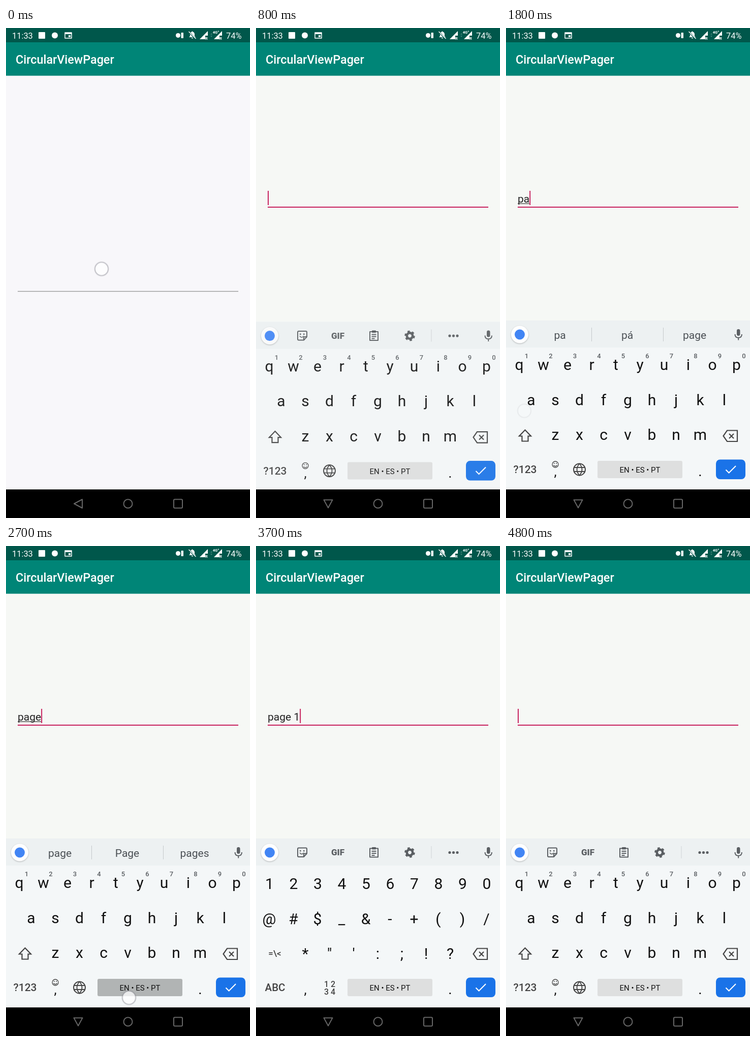
An HTML page with a canvas for the animation above (5100 ms loop, 480 by 960 pixels).

```html
<!DOCTYPE html>
<html lang="en">
<head>
<meta charset="utf-8">
<title>CircularViewPager</title>
<style>
html, body { margin: 0; height: 100%; overflow: hidden; background: #f6f8f5; }
canvas { display: block; }
</style>
</head>
<body>
<canvas id="stage" width="480" height="960"></canvas>
<script>
const ctx = document.getElementById('stage').getContext('2d');
const LOOP = 5100, STEP = 100;
const PINK = '#c8235f', ICON = '#5a5e62', INK = '#111';

// All schedules are [start ms, value], in order of time.
const TYPED = [[0, ''], [1300, 'p'], [1700, 'pa'], [2300, 'pag'], [2500, 'page'], [2800, 'page '], [3600, 'page 1']];
const WORDS = [[0, null], [1400, ['p', 'P', 'para']], [1800, ['pa', 'pá', 'page']], [2400, ['pag', 'page', 'pages']],
  [2600, ['page', 'Page', 'pages']], [2900, ['of', 'is', 'for']], [3700, null]];
const LAYOUT = [[0, 'letters'], [3200, 'symbols'], [4200, 'plain'], [4800, 'letters']];
// Touches: start, full until, faded until, x, y
const TOUCHES = [[0, 100, 200, 188, 472], [1100, 1300, 1400, 448, 665], [1500, 1700, 1800, 36, 750],
  [2200, 2300, 2400, 240, 730], [2400, 2500, 2600, 121, 662], [2700, 2800, 2900, 242, 885],
  [3000, 3200, 3300, 19, 891], [3500, 3600, 3700, 30, 655], [3900, 4000, 4100, 442, 865], [4500, 4600, 4700, 188, 315]];

const at = (schedule, t) => schedule.filter(([start]) => start <= t).pop()[1];
const quint = u => 1 - (1 - Math.min(1, Math.max(0, u))) ** 5;

function rect(x, y, w, h, color, r = 0) {
  ctx.fillStyle = color;
  ctx.beginPath();
  ctx.roundRect(x, y, w, h, r);
  ctx.fill();
}
// Filled unless a line width is given
function path(d, color, width) {
  const p = new Path2D(d);
  if (width) {
    ctx.strokeStyle = color;
    ctx.lineWidth = width;
    ctx.stroke(p);
  } else {
    ctx.fillStyle = color;
    ctx.fill(p);
  }
}
function circle(x, y, r, color, width) {
  path(`M${x - r} ${y}a${r} ${r} 0 1 1 ${2 * r} 0a${r} ${r} 0 1 1 ${-2 * r} 0z`, color, width);
}
function text(s, x, y, size, color = INK, weight = 400, align = 'center') {
  ctx.font = `${weight} ${size}px Roboto, sans-serif`;
  ctx.textAlign = align;
  ctx.fillStyle = color;
  ctx.fillText(s, x, y);
}
function row(keys, x, y, size = 30, color, weight) {
  [...keys].forEach((key, i) => text(key, x + i * 47.5, y, size, color, weight));
}

function drawHeader() {
  rect(0, 0, 480, 28, '#00574b');
  rect(0, 28, 480, 65.5, '#008577');
  text('CircularViewPager', 19, 70, 23.35, '#fff', 500, 'left');
  text('11:33', 12, 20.5, 16.4, '#fff', 400, 'left');
  text('74%', 433, 20.5, 16.4, '#fff', 400, 'left');
  rect(64, 8, 13, 13, '#fff', 1);
  circle(96, 14.5, 6, '#fff');
  path('M116 9h13v11h-13z', '#fff', 1.5);
  rect(116, 9, 13, 3, '#fff');
  rect(123, 14, 4, 4, '#fff');
  circle(338.5, 14.5, 4.5, '#fff');
  rect(344.5, 9, 4.5, 11, '#fff', 1);
  path('M360 18h13l-2-2v-4q-.5-4-3.5-4.5q-1-2.500-2 0q-3 .5-3.500 4.500v4zM364.500 19h4q-2 3.500-4 0z', '#fff');
  path('M359 6.500l14 15', '#00574b', 3);
  path('M359.500 7l14 14', '#fff', 1.4);
  for (const x of [381, 409]) {
    path(`M${x + 16} 6v9h-5v7h-${11}z`, '#fff');
    text('R', x + 13.5, 22.5, 7.5, '#fff', 700);
  }
  rect(407, 4, 12, 8, '#00574b');
  text('4G⁺', 413, 11, 7.5, '#fff', 700);
  path('M402 13l2-3l2 3zM402 15l2 3l2-3z', '#3f8177');
}

function drawNav(open) {
  rect(0, 904, 480, 56, '#000');
  ctx.lineJoin = 'round';
  path(open ? 'M133.500 924.500h17l-8.500 15.500z' : 'M150 923.500v17l-16-8.500z', '#666', 2);
  circle(240, 932, 8.5, '#666', 2);
  path('M332 923.500h13q2 0 2 2v13q0 2-2 2h-13q-2 0-2-2v-13q0-2 2-2z', '#666', 2);
}

function drawField(x, y, focused, value, composing) {
  rect(x + 23, y - (focused ? 1 : .5), 434, focused ? 2 : 1, focused ? PINK : '#777');
  text(value, x + 23, y - 9, 21, '#222', 400, 'left');
  const width = ctx.measureText(value).width;
  if (composing) rect(x + 23, y - 7.5, width, 1.2, '#333');
  if (focused) rect(x + 23 + width, y - 32, 2, 28, PINK);
}

function drawToolbar() {
  path('M84 591.500h14q2 0 2 2v9l-6 6.500h-10q-2 0-2-2v-13.500q0-2 2-2zM100 602.500h-4q-2 0-2 2v4', ICON, 2);
  path('M86 601q4 5 8 0', ICON, 1.6);
  rect(86, 596, 2.5, 2.5, ICON);
  rect(93, 596, 2.5, 2.5, ICON);
  text('GIF', 161, 606, 17, ICON, 900);
  path('M224 592.500h16v17h-16zM227.500 598h9m-9 4h9m-9 4h6', ICON, 2);
  rect(228, 590, 8, 4.5, ICON, 1);
  circle(302.5, 600.5, 5.7, ICON, 4.6);
  const tooth = 8.5 * Math.PI / 6;
  ctx.setLineDash([tooth, tooth]);
  circle(302.5, 600.5, 8.5, ICON, 3.6);
  ctx.setLineDash([]);
  rect(344.5, 588, 1, 24, '#cfd3d5');
  for (const x of [381, 388.5, 396]) circle(x, 600.5, 2.6, ICON);
}

function drawStrip(layout, words) {
  rect(0, 573, 480, 53, '#edf1f2');
  if (layout === 'plain') return row('1234567890', 25.5, 610.5, 26);
  ctx.save();
  ctx.shadowColor = 'rgba(0,0,0,.25)';
  ctx.shadowBlur = 3;
  ctx.shadowOffsetY = 1;
  circle(27, 600.5, 17, '#fff');
  ctx.restore();
  circle(27, 600.5, 10, '#4285f4');
  rect(454, 590, 6.5, 13, ICON, 3.2);
  path('M450.500 600q0 6.800 6.700 6.800t6.700-6.800M457.200 606.500v5', ICON, 2);
  if (!words) return drawToolbar();
  words.forEach((word, i) => text(word, 106 + i * 132.5, 608.5, 21, '#4a4f54'));
  rect(168, 587, 1, 27, '#c5c9cb');
  rect(309, 587, 1, 27, '#c5c9cb');
}

function drawKeyboard(layout, words, spaceDown) {
  rect(0, 573, 480, 331, '#f4f7f8');
  drawStrip(layout, words);
  ctx.lineJoin = 'miter';
  if (layout === 'symbols') {
    row('1234567890', 26.5, 672);
    row('@#$_&-+()/', 26, 740.5);
    row('*"\':;!?', 97, 809);
    text('=\\<', 37, 804, 17, '#444', 500);
    text('ABC', 37.5, 872, 20.5, '#444', 500);
    text('1 2', 145, 863.5, 16, '#444', 500);
    text('3 4', 145, 878.5, 16, '#444', 500);
  } else {
    row('qwertyuiop', 26, 670);
    row('asdfghjkl', 49.5, 738.5);
    row('zxcvbnm', 97, 807);
    path('M37.500 787.500l11.500 12h-5.500v10h-12v-10h-5.500z', '#444', 2.2);
    text('?123', 37.5, 872, 21, '#444', 500);
    circle(144.5, 865, 11.5, '#444', 2);
    path('M134 861h21m-21 8h21M144.500 853.500q-10 11.500 0 23q10-11.500 0-23', '#444', 1.8);
    if (layout === 'letters') {
      row('1234567890', 40.5, 647, 13, ICON, 500);
      circle(97, 855, 6, '#444', 1.3);
      path('M93.500 856.500q3.500 4.500 7 0', '#444', 1.3);
      circle(94.8, 853, 1, '#444');
      circle(99.2, 853, 1, '#444');
    }
  }
  path('M435 788.500h20v21.500h-20l-7.500-10.750zM439 795l9 9m0-9l-9 9', '#444', 2.2);
  text(',', 97, 878, 26);
  text('.', 382, 878, 28);
  rect(180, 848, 167, 34, spaceDown ? '#b1b4b4' : '#dedfdf', 3);
  text(layout === 'plain' ? 'English' : 'EN • ES • PT', 263.5, 871, 15);
  rect(413, 845.5, 58, 38.5, '#1a73e8', 8);
  path(layout === 'plain' ? 'M452 859v6.500h-19M438 860l-5.500 5.500l5.500 5.500' : 'M432.500 865.500l6 6l13.500-13.500', '#fff', 2.2);
}

function drawTouch([start, full, end, x, y], t) {
  // The second key's touch leaves a faint ring while nothing else moves
  const lingering = start === 1500 && t >= end && t < 2200;
  if (t < start || (t >= end && !lingering)) return;
  ctx.globalAlpha = t < full ? 1 : lingering ? .2 : .5;
  circle(x, y, 13, 'rgba(255,255,255,.75)');
  circle(x, y, 13.2, 'rgba(120,120,130,.2)', 3);
  circle(x, y, 13, 'rgba(120,120,130,.35)', 1.2);
  ctx.globalAlpha = 1;
}

function draw(t) {
  const open = t >= 600;
  rect(0, 0, 480, 960, t < 200 ? '#f8f7fa' : '#f6f8f5');
  if (!open) rect(0, 902, 480, 2, '#fff');

  const slide = 480 * quint((t - 4050) / 350), y = open ? 351 : 516;
  const typed = at(TYPED, t);
  if (slide < 480) drawField(-slide, y, t >= 200, typed, t < 2800);
  if (slide > 0) drawField(480 - slide, y, t >= 4700, '', false);

  const rise = quint((t - 640) / 400);
  if (rise > 0) {
    ctx.save();
    ctx.globalAlpha = rise;
    ctx.translate(0, 33 * (1 - rise));
    drawKeyboard(at(LAYOUT, t), at(WORDS, t), t === 2700);
    ctx.restore();
  }
  drawHeader();
  drawNav(open);
  TOUCHES.forEach(touch => drawTouch(touch, t));
}

function frame() {
  draw(Math.floor(performance.now() % LOOP / STEP) * STEP);
  requestAnimationFrame(frame);
}
frame();
</script>
</body>
</html>
```
